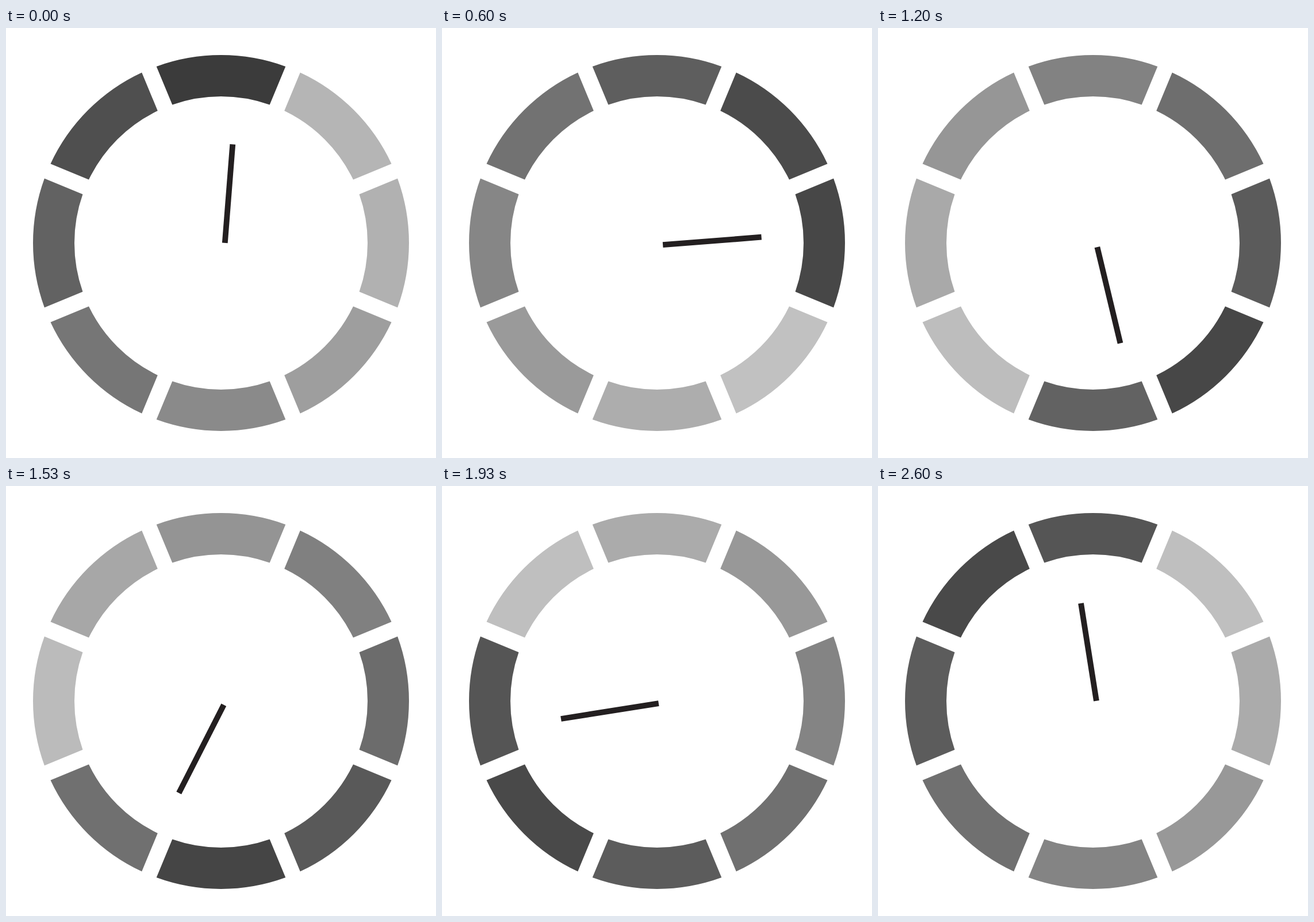
Animation of 748x748 px, one loop 2.67 s. Source, as an HTML page:

```html
<!DOCTYPE html>
<html lang="en">
<head>
<meta charset="utf-8">
<title>Dial</title>
<style>
html, body { margin: 0; width: 100%; height: 100%; overflow: hidden; background: #fff; }
svg { display: block; width: 100vw; height: 100vh; }
</style>
</head>
<body>
<svg viewBox="0 0 748 748">
  <g id="ring" transform="translate(374 374)"></g>
  <g transform="translate(380.5 377.5)">
    <rect id="hand" x="-4.9" y="-175.7" width="9.8" height="172" fill="#231f20"/>
  </g>
</svg>
<script>
const LOOP = 2670, STEPS = 40, TICKS = 80;
const OUTER = 327, INNER = 255, HALF_GAP = 13.8;
const DARK = 57, LIGHT = 195, FADE_TICKS = 70;

const ring = document.getElementById('ring');
const hand = document.getElementById('hand');

// Corner of a segment, cut so that the gaps have parallel sides.
function corner(r, side) {
  const a = Math.PI / 8 - Math.asin(HALF_GAP / r);
  return `${side * r * Math.sin(a)} ${-r * Math.cos(a)}`;
}

const shape = `M${corner(OUTER, -1)} A${OUTER} ${OUTER} 0 0 1 ${corner(OUTER, 1)}` +
  `L${corner(INNER, 1)} A${INNER} ${INNER} 0 0 0 ${corner(INNER, -1)}Z`;

const segments = Array.from({ length: 8 }, (_, k) => {
  const path = document.createElementNS('http://www.w3.org/2000/svg', 'path');
  path.setAttribute('d', shape);
  path.setAttribute('transform', `rotate(${45 * k})`);
  return ring.appendChild(path);
});

// Slow fade to light after the hand passes, quick darkening before it returns.
function shade(age) {
  const k = age < FADE_TICKS
    ? age / FADE_TICKS
    : (TICKS - age) / (TICKS - FADE_TICKS);
  return Math.round(DARK + (LIGHT - DARK) * k);
}

// The steps start on whole hundredths of a second.
const starts = Array.from({ length: STEPS }, (_, i) => Math.round(i * 20 / 3) * 10);

function draw(time) {
  const t = time % LOOP;
  const start = starts.findLast(s => s <= t);
  const tick = Math.floor((start + 3) * TICKS / LOOP) + 1;
  hand.setAttribute('transform', `rotate(${tick * 4.5})`);
  segments.forEach((path, k) => {
    const v = shade((tick - 10 * k + TICKS) % TICKS);
    path.setAttribute('fill', `rgb(${v},${v},${v})`);
  });
}

const begin = performance.now();
function frame() {
  draw(performance.now() - begin);
  requestAnimationFrame(frame);
}
draw(0);
requestAnimationFrame(frame);
</script>
</body>
</html>
```
